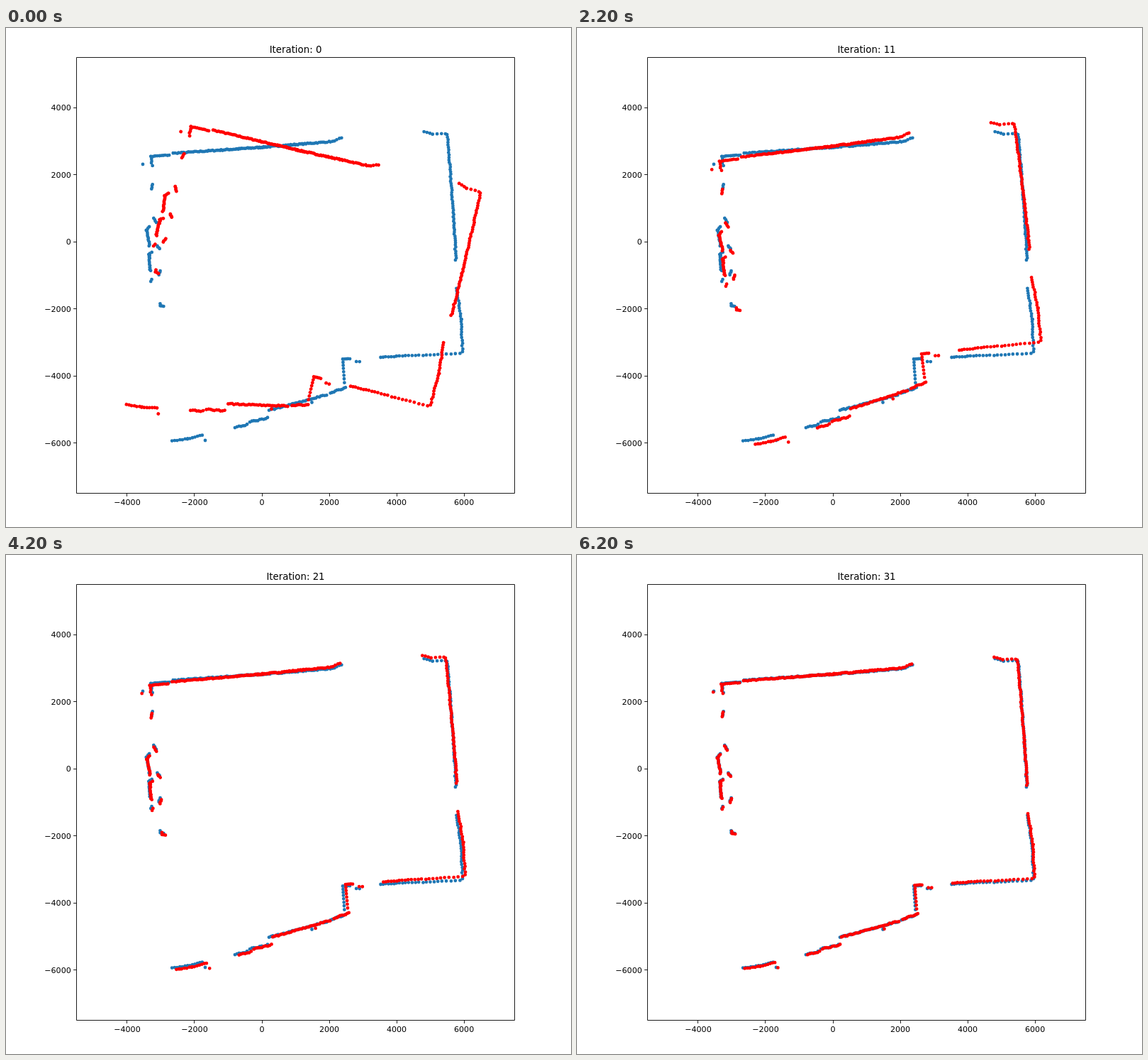
Recreate the animation shown at these times as an HTML page. Size 797 px wide and 703 px high, loop 6400 ms.

```html
<!DOCTYPE html>
<html lang="en">
<head>
<meta charset="utf-8">
<title>Scan alignment</title>
<style>
  html, body { margin: 0; width: 100%; height: 100%; overflow: hidden; background: #fff; }
  svg { display: block; }
  text { font: 11.11px "DejaVu Sans", sans-serif; fill: #000; }
  #title { font-size: 13.33px; text-anchor: middle; }
  #axes { fill: none; stroke: #000; stroke-width: .89; }
  .dots { fill: none; stroke-width: 4.8; stroke-linecap: round; }
</style>
</head>
<body>
<svg width="797" height="703" viewBox="0 0 797 703">
  <path id="fixed" class="dots" stroke="#1f77b4"/>
  <path id="moving" class="dots" stroke="#f00"/>
  <path id="axes"/>
  <g id="labels"></g>
  <text id="title" x="408.5" y="35"></text>
</svg>
<script>
const $ = id => document.getElementById(id);
const STEP = 200, COUNT = 32;
const ORIGIN = { x: 361, y: 301.25 };   // the scanner, at data point 0, 0
const RAY = .0112;                      // angle between two rays

// Corners of the room, one line per visible stretch of wall
const room = `
  193,192
  206,193.5 204.5,181 230,179
  236,176.5 362,168 463,159.7
  467,156.7 473,155.3
  589,146.5 602,149.5 620,149
  622.5,150 631.5,266 634.7,327
  636,367 642,410 644,456
  641,458.7 528,463.5
  498.5,469.7 494,469.7
  485,466 475,466.5 477,499
  479,506.5 457.5,514
  452,516.7 371,538.7
  431.5,527.5
  369,549.5 344,555
  340,559 323,562.7
  281,581
  277,573 256,579 234,582
  222.5,392 218,391 218,388
  215,348 218,342
  204.5,357 206,354
  203.5,342 202,319 205,316
  216,311 214,307
  202.5,307 198,285 202.5,280
  212,274 208.5,268
  206,227 207,220.5`;

// Pose at key iterations: iteration, angle in degrees, shift x, shift y
const poses = [
  [0, 17.22, -2.7, 7.9], [4, 1.83, 6.3, -2.1], [11, -2.95, 5.1, -3.35],
  [16, -2.17, 3.15, -2.05], [21, -1.1, 1.7, -.9], [25, -1.13, 1.2, -.9], [31, -.47, .5, -.5]
];
const SETTLED = 11, DECAY = .7;

let seed = 7;
function jitter(size) {
  seed = (seed * 16807) % 2147483647;
  return (seed / 2147483647 - .5) * 2 * size;
}

const dot = (x, y) => `M${x.toFixed(2)} ${y.toFixed(2)}h0`;

// Dots where evenly turned rays meet the wall from a to b, with range noise
function castRays([ax, ay], [bx, by]) {
  const ux = ax - ORIGIN.x, uy = ay - ORIGIN.y, vx = bx - ORIGIN.x, vy = by - ORIGIN.y;
  const turn = Math.atan2(ux * vy - uy * vx, ux * vx + uy * vy);
  const n = Math.max(1, Math.round(Math.abs(turn) / RAY));
  const from = Math.atan2(uy, ux), cross = ux * vy - uy * vx;
  let d = "";
  for (let i = 0; i <= n; i++) {
    const a = from + turn * i / n, c = Math.cos(a), s = Math.sin(a);
    const range = cross / (c * (vy - uy) - s * (vx - ux)) + jitter(.8);
    d += dot(ORIGIN.x + c * range, ORIGIN.y + s * range);
  }
  return d;
}

function scan() {
  return room.trim().split("\n").map(line => {
    const pts = line.trim().split(" ").map(p => p.split(",").map(Number));
    return pts.length === 1 ? dot(...pts[0])
      : pts.slice(1).map((p, i) => castRays(pts[i], p)).join("");
  }).join("");
}

function drawAxes() {
  let d = "M99.5 41.5H717.5V655.5H99.5Z", labels = "";
  const text = (x, y, anchor, v) =>
    `<text x="${x}" y="${y}" text-anchor="${anchor}">${String(v).replace("-", "\u2212")}</text>`;
  for (let v = -6000; v <= 6000; v += 2000) {
    const x = ORIGIN.x + v * .047513, y = ORIGIN.y - v * .04722;
    if (v > -6000) {
      d += `M${Math.floor(x) + .5} 655.5v4.4`;
      labels += text(x, 671.6, "middle", v);
    }
    if (v < 6000) {
      d += `M99.5 ${Math.floor(y) + .5}h-4.4`;
      labels += text(91.8, y + 4.1, "end", v);
    }
  }
  $("axes").setAttribute("d", d);
  $("labels").innerHTML = labels;
}

// Geometric approach at first, then a slow even drift
function poseAt(n) {
  const i = Math.max(1, poses.findIndex(p => p[0] >= n));
  const a = poses[i - 1], b = poses[i], done = n - a[0], span = b[0] - a[0];
  const f = n <= SETTLED ? (1 - DECAY ** done) / (1 - DECAY ** span) : done / span;
  return a.map((v, j) => v + (b[j] - v) * f);
}

// Rotation about a fixed pivot; the two axes differ slightly in scale
function matrix(n) {
  const [, deg, tx, ty] = poseAt(n);
  const px = 400, py = 350, ratio = 1.0062, rad = deg * Math.PI / 180;
  const c = Math.cos(rad), b = Math.sin(rad) / ratio, k = -Math.sin(rad) * ratio;
  const e = px + tx - c * px - k * py, f = py + ty - b * px - c * py;
  return `matrix(${[c, b, k, c, e, f].join(" ")})`;
}

let shown = -1, start;
function frame(now) {
  start ??= now;
  const n = Math.floor(Math.max(0, now - start) / STEP) % COUNT;
  if (n !== shown) {
    shown = n;
    $("moving").setAttribute("transform", matrix(n));
    $("title").textContent = "Iteration: " + n;
  }
  requestAnimationFrame(frame);
}

const dots = scan();
$("fixed").setAttribute("d", dots);
$("moving").setAttribute("d", dots);
drawAxes();
frame(performance.now());
</script>
</body>
</html>
```
